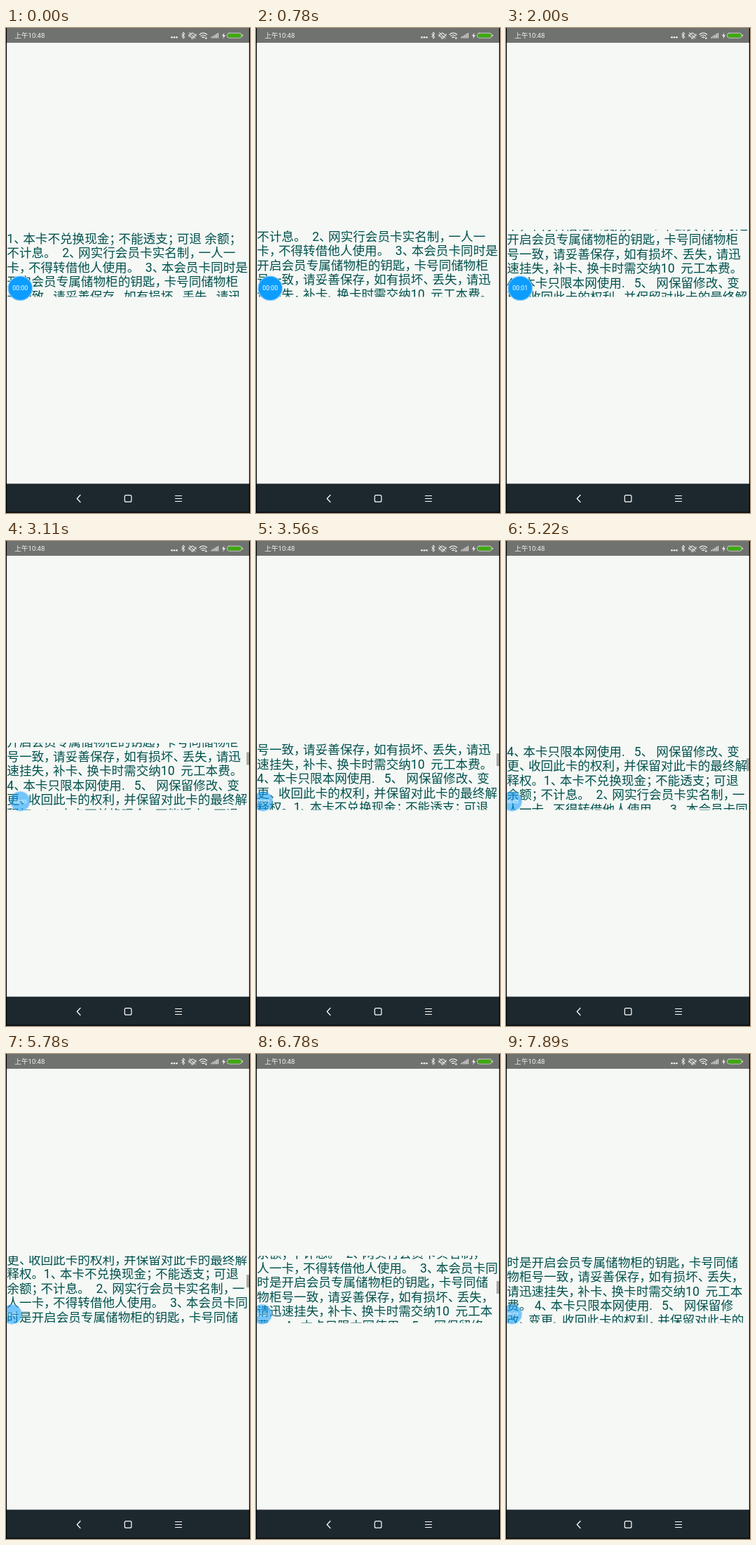
These frames come from a looping animation (348 px wide and 690 px high, 8 s). An HTML page:

```html
<!DOCTYPE html>
<html lang="zh-CN">
<head>
<meta charset="utf-8">
<style>
  html, body { margin: 0; width: 100%; height: 100%; overflow: hidden; background: #f5f8f5; }
  svg { display: block; width: 348px; height: 690px; }
  text { font-family: Roboto, "Noto Sans CJK SC", "Noto Sans CJK", sans-serif; white-space: pre; }
  #notice { font-size: 17.6px; fill: #00514d; }
  .narrow { letter-spacing: -4.6px; }
  .line { fill: none; stroke: #fff; stroke-linecap: round; stroke-linejoin: round; }
</style>
</head>
<body>
<svg viewBox="0 0 348 690">
  <clipPath id="view"><rect y="287" width="348" height="95.5"/></clipPath>
  <rect width="348" height="690" fill="#f5f8f5"/>

  <g clip-path="url(#view)"><g id="notice"></g></g>
  <rect id="scrollbar" x="343" width="5" height="18" fill="#a9aba9"/>

  <!-- status bar -->
  <rect width="348" height="21" fill="#70726f"/>
  <text x="12.3" y="14.3" font-size="9.6" fill="#f2f2f2">上午10:48</text>
  <g fill="#f2f2f2">
    <circle cx="236.5" cy="13.3" r="1.3"/><circle cx="240" cy="13.3" r="1.3"/><circle cx="243.5" cy="13.3" r="1.3"/>
    <circle cx="285.3" cy="14.5" r="1.2"/>
    <path d="M311.5 6.5l-3.5 5h2.3l-1 4 3.7-5.2h-2.4z"/>
    <path d="M292.5 12.5h1.4v2h-1.4zM294.8 11h1.4v3.5h-1.4zM297.1 9.7h1.4v4.8h-1.4zM299.4 8.3h1.4v6.2h-1.4zM301.7 7h1.4v7.5h-1.4z" opacity=".85"/>
  </g>
  <g class="line">
    <path d="M250.5 8.5l4.6 4.2-2.4 2.3V6l2.4 2.3-4.6 4.2" stroke-width=".9"/>
    <path d="M263 12.6a3.4 3.4 0 1 1 5.4.2zM264.6 14.9h2.6M261.6 6.6l8.6 8M261 9v3M270.8 8.6v3" stroke-width="1"/>
    <path d="M276 9.2q5.3-4.4 10.6 0M277.8 11.4q3.5-2.8 7 0M279.8 13.4q1.5-1 3 0" stroke-width="1.2"/>
    <rect x="315.5" y="7.2" width="20.5" height="7" rx="3" stroke-width=".8" stroke="#dfe6dc"/>
    <path d="M337.3 9.8v1.8" stroke-width="1"/>
  </g>
  <rect x="316.3" y="8" width="18.9" height="5.4" rx="2.2" fill="#3fa912"/>

  <!-- navigation bar -->
  <rect y="648.3" width="348" height="41.7" fill="#1d282e"/>
  <g class="line" stroke-width="1.2">
    <path d="M106 664.5l-4.7 5 4.7 5"/>
    <rect x="169.3" y="664.6" width="9.6" height="9.6" rx="2"/>
    <path d="M241.5 665.5h9M241.5 669.5h9M241.5 673.5h9"/>
  </g>

  <g id="bubble">
    <circle r="17.2" fill="#0d9dff" stroke="#8accfa" stroke-width="1.2"/>
    <text id="clock" y="3.1" font-size="8.8" fill="#fff" text-anchor="middle"></text>
  </g>
  <path d="M.5 0v690M347.4 0v690M0 689h348" stroke="#000" stroke-width="1.2" fill="none"/>
</svg>
<script>
const LOOP = 8000, FPS = 9, PITCH = 20.5;
const lines = `1、本卡不兑换现金；不能透支；可退 余额；
不计息。   2、网实行会员卡实名制，一人一
卡，不得转借他人使用。   3、本会员卡同时是
开启会员专属储物柜的钥匙，卡号同储物柜
号一致，请妥善保存，如有损坏、丢失，请迅
速挂失，补卡、换卡时需交纳10  元工本费。
4、本卡只限本网使用.   5、  网保留修改、变
更、收回此卡的权利，并保留对此卡的最终解
释权。 1、本卡不兑换现金；不能透支；可退
余额；不计息。   2、网实行会员卡实名制，一
人一卡，不得转借他人使用。   3、本会员卡同
时是开启会员专属储物柜的钥匙，卡号同储
物柜号一致，请妥善保存，如有损坏、丢失，
请迅速挂失，补卡、换卡时需交纳10  元工本
费。  4、本卡只限本网使用.   5、  网保留修
改、变更、收回此卡的权利，并保留对此卡的`.split('\n');

// [ms, pixels scrolled]
const scrollKeys = [[0, 0], [2000, 60], [2440, 72], [2890, 72], [3110, 75], [4000, 94.5],
  [5220, 123], [6780, 200.3], [7890, 228.5], [8000, 231]];

const $ = id => document.getElementById(id);
const notice = $('notice'), scrollbar = $('scrollbar'), bubble = $('bubble'), clock = $('clock');

notice.innerHTML = lines.map((line, i) =>
  `<text x="1.3" y="${305.8 + i * PITCH}">${line.replace(/[、，。；]/g, '<tspan class="narrow">$&</tspan>')}</text>`).join('');

const ramp = (t, from, to) => Math.min(1, Math.max(0, (t - from) / (to - from)));
const mix = (a, b, k) => a + (b - a) * k;

function scrollAt(t) {
  const i = scrollKeys.findIndex(key => key[0] > t);
  const [t0, y0] = scrollKeys[i - 1], [t1, y1] = scrollKeys[i];
  return mix(y0, y1, ramp(t, t0, t1));
}

function render(t) {
  const scroll = scrollAt(t);
  notice.setAttribute('transform', `translate(0 ${-scroll})`);

  scrollbar.setAttribute('y', 287 + scroll * 0.18);
  scrollbar.setAttribute('opacity', t < 2990 ? 0 : 1 - ramp(t, 7400, 7750));

  const fade = ramp(t, 2560, 2780), dock = ramp(t, 3200, 3600);
  bubble.setAttribute('transform', `translate(${mix(20.3, 8.7, dock)} 370.3) scale(${mix(1, 0.82, fade)})`);
  bubble.setAttribute('opacity', mix(1, 0.55, fade));
  clock.textContent = '00:0' + Math.max(0, Math.floor((t - 100) / 1000));
}

function tick() {
  const step = Math.floor((performance.now() % LOOP) * FPS / 1000 + 0.1);
  render((step * 1000 / FPS) % LOOP);
  requestAnimationFrame(tick);
}
tick();
</script>
</body>
</html>
```
